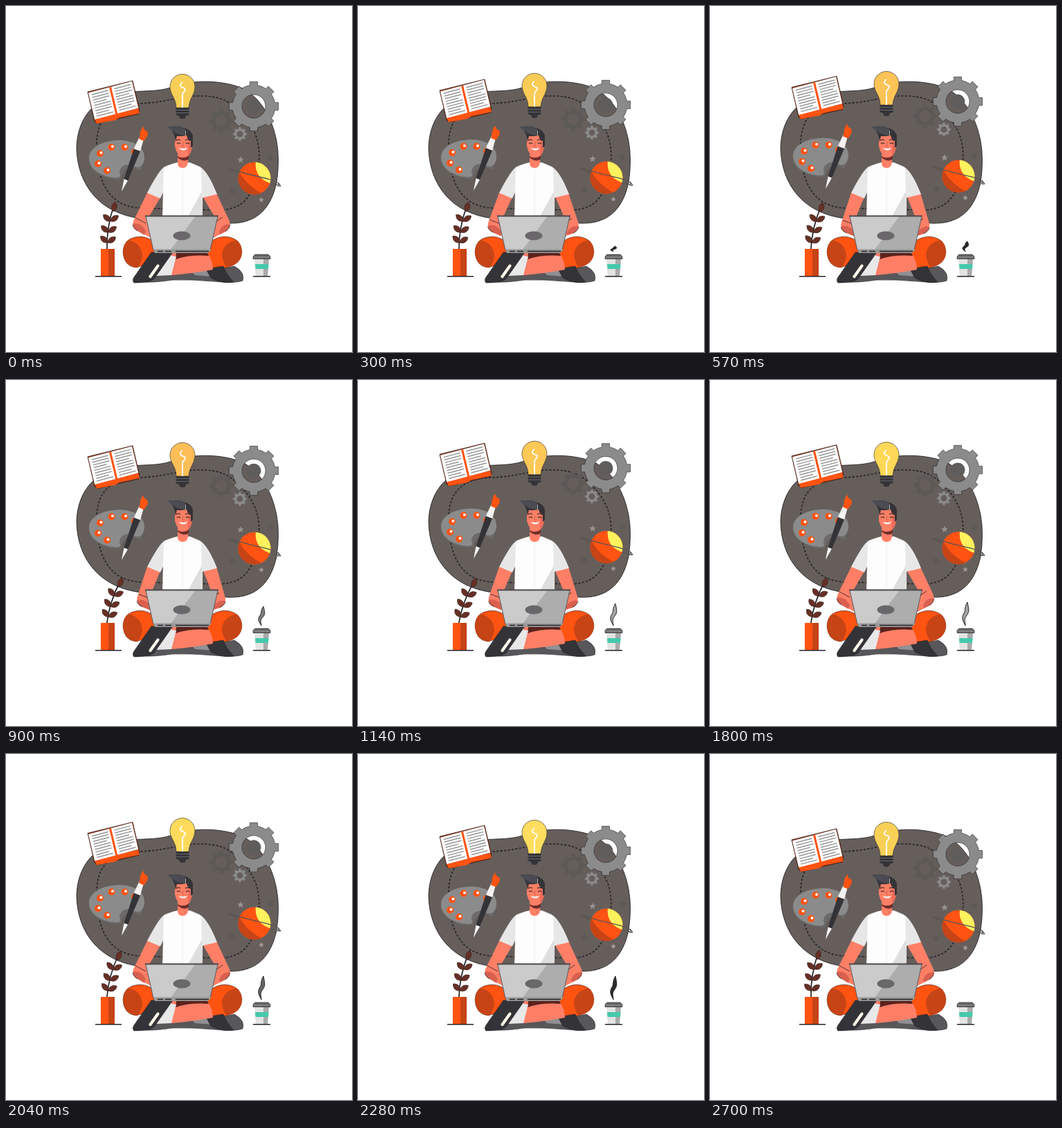
Write an HTML page that moves like this. It is 500 by 500 pixels and loops after 2.76 s.

```html
<!DOCTYPE html>
<html lang="en">
<head>
<meta charset="utf-8">
<style>
html, body { margin: 0; width: 100%; height: 100%; overflow: hidden; background: #fff; }
svg { display: block; width: 100vw; height: 100vh; }
.o { fill: #ff5312; } .od { fill: #c64416; } .k { fill: #343338; }
.g { fill: #8b8b8b; } .dg { fill: #5c5957; } .skin { fill: #ff7f66; } .w { fill: #fff; }
.line { fill: none; stroke: #242326; }
.rim { stroke: #242326; stroke-width: .6; }
</style>
</head>
<body>
<svg viewBox="0 0 500 500">
  <defs>
    <clipPath id="steamClip"><rect x="355" y="310" width="30" id="reveal"/></clipPath>
    <clipPath id="planetClip"><circle cx="359" cy="249" r="23.5"/></clipPath>
    <clipPath id="laptopClip"><path d="M202 304H306L295 353H213Z"/></clipPath>
    <path id="star" d="M0-5 1.4-1.6 5-1.5 2.2.8 3.1 4.4 0 2.4-3.1 4.4-2.2.8-5-1.5-1.4-1.6Z"/>
  </defs>

  <path fill="#665e5b" stroke="#242326" stroke-width=".9" d="M102 205C103 160 130 128 180 124C207 122 224 124 246 115C280 105 318 109 342 119C370 134 385 164 391 195Q396 222 391 255C382 298 357 315 322 314C275 311 240 313 195 307C135 300 103 258 102 205Z"/>
  <path class="line" stroke-width="1.6" stroke-dasharray="3.2 2.3" d="M131 200C131 163 150 143 190 141C230 140 247 131 275 130C313 129 325 139 342 157C364 181 369 205 364 240C355 283 336 296 300 295C260 293 225 293 195 292C149 290 131 255 131 200Z"/>

  <g data-rise="18">
    <path fill="#8a3518" d="M118 124 183 108 193 151 192 156 132 170 128 167Z" stroke="#3a211d" stroke-width=".8"/>
    <path class="o" d="M128 163 191 148 193 155 164 161 158 165 131 170Z"/>
    <g transform="matrix(.985 -.26 .23 .965 119 125.500)">
      <path class="w" d="M0 0H64V40H0Z"/>
      <path class="o" d="M30.500 0h3v42h-3Z"/>
      <g id="bookLines" stroke="#969696" stroke-width="1.5"></g>
    </g>
  </g>

  <g data-rise="11">
    <path id="glass" class="rim" d="M255 98.500A18 18 0 0 1 273 117C273 128 265 133 264 147H246C246 133 237 128 237 117A18 18 0 0 1 255 98.500Z"/>
    <path class="line" style="stroke:#fff" stroke-width="1.8" d="M255 147V128C255 124 260 124 259 120C257 117 251 118 252 114Q253 111 255 110"/>
    <path class="k" d="M245.500 147H264.500V158H261L258 163H252L249 158H245.500Z"/>
    <path d="M245 150.500H265M245 154.500H265" stroke="#777" stroke-width=".8"/>
  </g>

  <path class="dg" data-rise="18" data-gear="311,166,17,13.500,8.500"/>
  <g data-rise="19">
    <path class="g rim" data-gear="358,145,36,31,17"/>
    <circle cx="358" cy="145" r="10.500" fill="#5f5d5c"/>
  </g>
  <path class="g" data-rise="18" data-gear="338,185,10,7.800,4.500"/>

  <g data-rise="8">
    <use href="#star" x="339" y="222" fill="#96928f"/>
    <use href="#star" transform="translate(369 280) scale(.8)" fill="#a09c9a"/>
    <use href="#star" transform="translate(382 219) scale(1.2)" class="dg"/>
    <use href="#star" transform="translate(327 267) scale(1.2)" class="dg"/>
    <g clip-path="url(#planetClip)">
      <path class="o" d="M335 225H383V273H335Z"/>
      <path class="od" d="M335 235Q344 257 370 271L355 275H335Z"/>
      <path fill="#fff25d" d="M361 224Q358 249 384 257V224Z"/>
    </g>
    <path class="line" style="stroke:#595552" stroke-width="1.300" d="M336 242C313 231 321 235 350 243L379 250C398 256 400 261 383 257"/>
    <path class="line" stroke-width="1" d="M393 255 397 260 392 260"/>
  </g>

  <g data-rise="9">
    <path fill="#6c6b6b" d="M120 222C121 206 140 195 165 195C190 195 201 207 200 222L194 238C183 230 168 233 166 250C140 251 120 238 120 222Z"/>
    <path class="g" d="M120 219C121 204 140 194 165 194C190 195 201 207 200 220C199 231 192 236 184 231C172 225 161 235 165 244Q166 248 159 248C138 247 120 236 120 219Z"/>
    <g id="paints"></g>
  </g>
  <g data-rise="10.500">
    <g transform="translate(167 268) rotate(20.500)">
      <path class="w" d="M0 0-3-19H3Z"/>
      <path class="k" d="M-3-18H3L5-64H-5Z"/>
      <path fill="#f4f2f1" d="M-5-64H5L3.500-82H-3.500Z"/>
    </g>
    <path class="o" d="M192 192C195 186 192 180 199 174Q198 179 204 181C207 187 201 193 199 195Z"/>
  </g>

  <g id="plant">
    <path class="line" stroke-width="1.700" d="M146 352Q145 320 156 288"/>
    <g id="leaves" fill="#672f25" stroke="#33201e" stroke-width=".6"></g>
  </g>
  <path class="o" d="M137 351H157V391H137Z"/>
  <path class="od" d="M148 351H157V391H148Z"/>
  <path class="line" stroke-width="1.500" d="M129 390.750H167M357 390.750H382"/>

  <g clip-path="url(#steamClip)">
    <path id="steam" stroke="#1c1c1e" d="M372 321C367 329 370 333 367 337C362 345 367 350 369 355C369 349 366 347 371 340C376 334 373 328 372 321Z"/>
  </g>
  <path fill="#e3e3e3" d="M359 365H380L378 390H361Z"/>
  <path fill="#a9a9a9" d="M372 365H380L378 390H372Z"/>
  <path fill="#46c9ab" d="M360 373H379.500L379 380H360.500Z"/>
  <path class="rim" fill="#666" d="M360 359H379L382 362V365.500H357V362Z"/>
  <path stroke="#999" d="M358 363H381"/>

  <g id="armL">
    <path class="skin" d="M205 268 224 275 204 309 222 326 213 337 190 325Q181 321 184 311Z"/>
    <path fill="#d9604f" d="M184 314Q196 313 202 325L200 331 190 325Q183 321 184 314Z"/>
    <path class="line" stroke-width=".8" d="M187 306 202 314M183 316Q184 321 190 325"/>
  </g>
  <g id="armR">
    <path class="skin" d="M303 268 284 275 304 309 288 326 296 337 317 326Q326 321 323 311Z"/>
    <path fill="#d9604f" d="M323 315Q312 315 308 326L309 330 317 326Q323 322 323 315Z"/>
    <path class="line" stroke-width=".8" d="M313 305 299 315M324 316Q323 322 317 326"/>
  </g>

  <path fill="#e7e7e7" d="M239 229 228 233Q220 239 204 270L223 278 230 263V304H284V277L305 272Q292 239 280 232L266 226Z"/>
  <path fill="#fdfdfd" d="M248 226Q236 229 228 233L226 304H284L282 234 263 226Z"/>
  <path fill="#dedede" d="M283 268 284 304H263Z"/>
  <path d="M255 236V304" stroke="#ededed"/>
  <path class="skin" d="M248 212H263V226Q262 234 255 234T248 226Z"/>
  <path fill="#6e2d2b" d="M248 217Q255 222 264 216V221Q258 227 248 219Z"/>
  <path class="skin" d="M244 184H269V203Q267 218 257 219Q247 217 244 203Z"/>
  <path fill="#e96c58" d="M264 188H269V203Q267 214 263 217Z"/>
  <path class="k" d="M234 175Q247 172 256 176Q267 178 270 187V202L267 205V195Q262 193 261 187Q252 189 247 188L245 197 244 190Q242 180 234 175Z"/>
  <path fill="#4b4c53" d="M234 175Q247 172 259 178V187Q246 188 234 175Z"/>
  <path class="line" style="stroke:#ddd" stroke-width=".7" d="M259.500 180V187"/>
  <path class="line" d="M246 194Q249 192 252 194M259 194Q262 192 265 194M247 199Q249 197 252 199M260 199Q262 197 265 199" stroke-width="1.2"/>
  <path class="line" stroke-width=".7" style="stroke:#b84d42" d="M256 197 255 203H257"/>
  <path class="w" d="M249 205Q256 207 262 205Q257 212 249 205Z"/>

  <path class="rim" fill="#58575a" d="M184 398Q190 390 220 388T270 386Q282 383 300 382L330 376Q346 385 342 397Q332 401 300 398T240 396Q210 401 184 398Z"/>
  <path class="o rim" d="M213 340Q201 331 187 334Q170 337 169 355Q170 376 188 378L215 370ZM296 340Q309 331 323 334Q340 338 341 355Q340 373 318 378L290 383 288 350Z"/>
  <path class="od" d="M177 338Q196 343 197 361Q196 371 190 378Q170 376 169 355Q170 343 177 338ZM333 338Q313 343 312 360Q313 371 319 378Q341 373 341 355Q340 343 333 338Z"/>
  <path fill="#8f8f92" d="M268 383 289 378 300 391 273 389Z"/>
  <path class="k rim" d="M289 380 314 376Q317 386 329 399Q313 402 296 393Z"/>
  <path class="skin" d="M239 357H291Q299 369 299 381Q272 386 239 389Z"/>
  <path fill="#5b221e" d="M246 357H291L293 361Q266 359 245 366Z"/>
  <path fill="#e8e8e8" d="M222 358 246 362 239 389 216 390Z"/>
  <path class="k rim" d="M210 356H241L215 393Q211 400 185 400Q181 396 187 389Z"/>
  <path d="M208.500 391 219.500 375.500" stroke="#fff9ed" stroke-width="4.200" stroke-linecap="round"/>

  <g clip-path="url(#laptopClip)">
    <path fill="#adadad" d="M200 302H308V356H200Z"/>
    <path fill="#cbcbcb" d="M200 302H275L235 356H200Z"/>
  </g>
  <path class="line" style="stroke:#58575a" d="M202 304 213 353M306 304 295 353"/>
  <path class="line" style="stroke:#4c4a4d" stroke-width="2" d="M201 303.500H307"/>
  <ellipse cx="254" cy="332" rx="12.500" ry="6.500" fill="#69676a"/>
  <path fill="#999" d="M213 351.500H297L292 357H215Z"/>
  <path class="line" stroke-width="1.500" d="M219 354.500H227M230 354.500H239M245 354.500H293"/>
</svg>

<script>
const LOOP = 2760, STEP = 30;
const $ = id => document.getElementById(id);

function add(parent, tag, attrs) {
  const node = document.createElementNS('http://www.w3.org/2000/svg', tag);
  for (const name in attrs) node.setAttribute(name, attrs[name]);
  return parent.appendChild(node);
}

// Eight square teeth around a ring with a see-through hole.
function gearPath(cx, cy, outer, inner, hole) {
  const points = [];
  for (let i = 0; i < 8; i++) {
    const mid = i * Math.PI / 4, half = outer * .155;
    for (const [side, r] of [[-1, inner], [-1, outer], [1, outer], [1, inner]]) {
      const a = mid + Math.asin(side * half / r);
      points.push(`${cx + r * Math.sin(a)} ${cy - r * Math.cos(a)}`);
    }
    const next = mid + Math.PI / 8;
    points.push(`${cx + inner * Math.sin(next)} ${cy - inner * Math.cos(next)}`);
  }
  return `M${points.join('L')}ZM${cx - hole} ${cy}a${hole} ${hole} 0 1 0 ${2 * hole} 0a${hole} ${hole} 0 1 0 ${-2 * hole} 0Z`;
}

for (const gear of document.querySelectorAll('[data-gear]')) {
  gear.setAttribute('d', gearPath(...gear.dataset.gear.split(',').map(Number)));
  gear.setAttribute('fill-rule', 'evenodd');
}

for (let i = 0; i < 9; i++) {
  const y = 4 + i * 4, short = i % 4 === 3 ? 5 : 0;
  add($('bookLines'), 'path', { d: `M4 ${y}H${28 - short}M37 ${y}H${61 - short}` });
}

for (const [cx, cy] of [[136, 213], [152.5, 204], [171.5, 204], [186, 211], [133, 228], [146, 238]]) {
  add($('paints'), 'circle', { cx, cy, r: 5, class: 'o' });
  add($('paints'), 'circle', { cx: cx + 1.5, cy: cy - 1, r: 2, class: 'w' });
}

const leaf = (x, y, angle) => add($('leaves'), 'path', {
  d: 'M0 0C-5-4-5-10 0-14C5-10 5-4 0 0Z', transform: `translate(${x} ${y}) rotate(${angle})`
});
for (const [x, y] of [[147, 342], [148, 327], [151, 311]]) {
  leaf(x, y, -48);
  leaf(x, y, 55);
}
leaf(155, 297, 12);

// Keys are [time, value...] rows, eased between neighbours.
function track(keys, t) {
  const i = Math.max(1, keys.findIndex(key => key[0] >= t));
  const [t0, ...from] = keys[i - 1], [t1, ...to] = keys[i];
  const p = (t - t0) / (t1 - t0), e = p * p * (3 - 2 * p);
  return from.map((v, n) => v + (to[n] - v) * e);
}

const armKeys = [[0, 0], [450, 1], [1000, 1], [1750, 0], [LOOP, 0]];
const glassKeys = [[0, 248, 207, 86], [900, 254, 190, 87], [1410, 255, 212, 84], [2280, 255, 221, 94], [LOOP, 248, 207, 86]];
const steamHeight = [[0, 0], [570, .44], [900, .82], [1300, 1], [LOOP, 1]];
const steamBottom = [[0, 356], [2280, 356], [2680, 318], [LOOP, 318]];
const steamGray = [[0, 30], [570, 40], [1100, 165], [1800, 165], [2280, 45], [LOOP, 30]];
const floaters = document.querySelectorAll('[data-rise]');

function draw(now) {
  const t = Math.min(Math.floor(now % LOOP / STEP) * STEP, LOOP - 2 * STEP);
  const lift = (1 - Math.cos(2 * Math.PI * t / LOOP)) / 2;
  for (const node of floaters) node.setAttribute('transform', `translate(0 ${-node.dataset.rise * lift})`);
  $('plant').setAttribute('transform', `rotate(${12 * lift} 146 350)`);

  const [arm] = track(armKeys, t);
  $('armL').setAttribute('transform', `rotate(${-8 * arm} 215 275)`);
  $('armR').setAttribute('transform', `rotate(${9 * arm} 294 275)`);
  $('glass').setAttribute('fill', `rgb(${track(glassKeys, t).map(Math.round)})`);

  const [height] = track(steamHeight, t), [gray] = track(steamGray, t);
  $('steam').setAttribute('transform', `translate(0 ${355 * (1 - height)}) scale(1 ${height})`);
  $('steam').setAttribute('fill', `rgb(${gray},${gray},${gray})`);
  $('reveal').setAttribute('height', track(steamBottom, t)[0] - 310);
  requestAnimationFrame(() => draw(performance.now()));
}
draw(performance.now());
</script>
</body>
</html>
```
